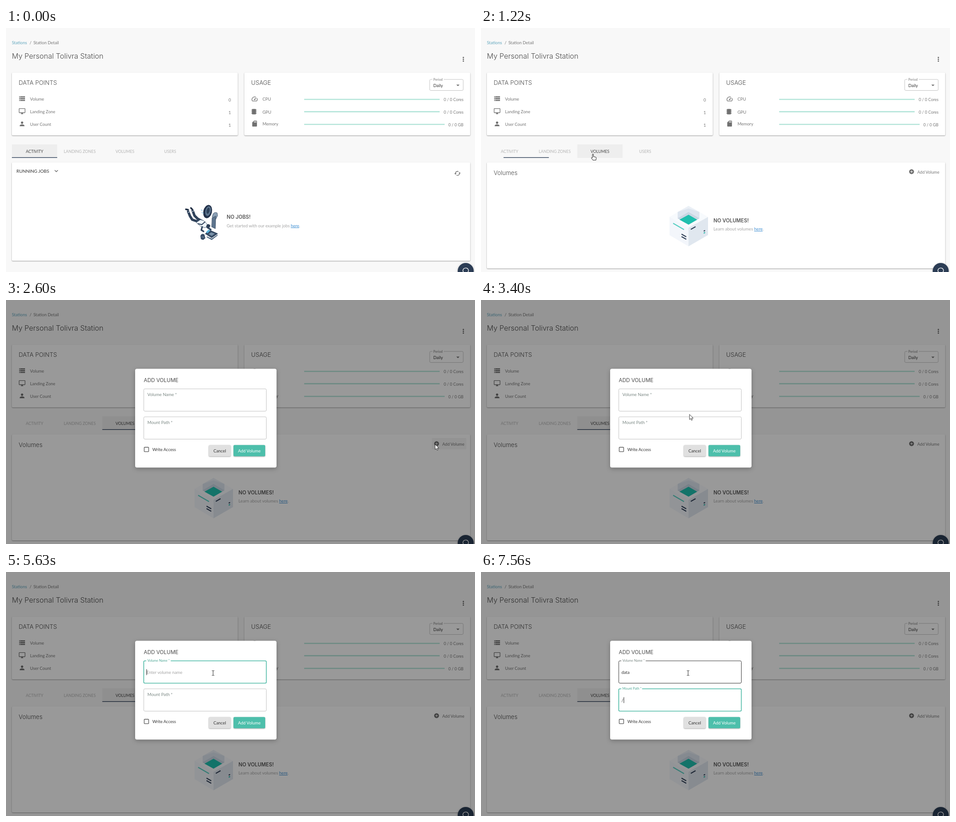
An HTML page for the animation above (8000 ms loop, 1035 by 541 pixels).

```html
<!DOCTYPE html>
<html lang="en">
<head>
<meta charset="utf-8">
<title>Add a volume</title>
<style>
  html, body { margin: 0; width: 100%; height: 100%; overflow: hidden; background: #f8f8f8; }
  svg { display: block; width: 100%; height: 100%; }
  text { font: 9.4px Lato, "Open Sans", sans-serif; fill: #777; white-space: pre; }
  .head { font: 300 13.1px Inter, sans-serif; fill: #4a4a4a; }
  .bold { font: 600 11.1px Inter, sans-serif; fill: #555; }
  .end { text-anchor: end; }
  .mid { text-anchor: middle; }
  .tab { font-size: 8.8px; text-anchor: middle; fill: #b4b4b4; }
  .tab.on { fill: #444; }
  .load { font-size: 8.9px; text-anchor: end; }
  .pale { fill: #a5a5a5; }
  .link { fill: #3f8fd2; text-decoration: underline; }
  .dark { fill: #333; }
  .card { fill: #fff; filter: drop-shadow(0 1px 1px rgba(0,0,0,.38)); }
  .icon { fill: #707070; }
  .bar { stroke: #b5e5da; stroke-width: 2.6; }
  .line { fill: none; stroke: #c2c2c2; }
  .btn { filter: drop-shadow(0 1px 1px rgba(0,0,0,.35)); }
</style>
</head>
<body>
<svg viewBox="0 0 1035 541" preserveAspectRatio="none">
  <rect width="1035" height="541" fill="#f8f8f8"/>

  <!-- heading -->
  <text x="13" y="35.5" style="fill:#5fa5bd">Stations</text>
  <text x="52" y="35.5">/</text>
  <text x="60.5" y="35.5">Station Detail</text>
  <text class="head" x="13" y="68" style="font-size:16px">My Personal Tolivra Station</text>
  <g fill="#555"><circle cx="1009.3" cy="65.3" r="1.4"/><circle cx="1009.3" cy="69.3" r="1.4"/><circle cx="1009.3" cy="73.3" r="1.4"/></g>

  <!-- data points -->
  <rect class="card" x="13" y="99" width="498.5" height="139" rx="2"/>
  <text class="head" x="28" y="126">DATA POINTS</text>
  <g class="icon">
    <path transform="translate(27.7 148.8) scale(.65)" d="M2 20h20v-4H2v4zm2-3h2v2H4v-2zM2 4v4h20V4H2zm4 3H4V5h2v2zm-4 7h20v-4H2v4zm2-3h2v2H4v-2z"/>
    <path transform="translate(27.7 176.7) scale(.65)" d="M21 2H3c-1.1 0-2 .9-2 2v12c0 1.1.9 2 2 2h7v2H8v2h8v-2h-2v-2h7c1.1 0 2-.9 2-2V4c0-1.1-.9-2-2-2zm0 14H3V4h18v12z"/>
    <path transform="translate(27.7 204.7) scale(.65)" d="M12 12c2.2 0 4-1.8 4-4s-1.8-4-4-4-4 1.8-4 4 1.8 4 4 4zm0 2c-2.7 0-8 1.3-8 4v2h16v-2c0-2.7-5.3-4-8-4z"/>
  </g>
  <text x="53" y="160.5">Volume</text><text class="end" x="496.5" y="162.5">0</text>
  <text x="53" y="188.5">Landing Zone</text><text class="end" x="496.5" y="190.5">1</text>
  <text x="53" y="216.5">User Count</text><text class="end" x="496.5" y="218.5">1</text>

  <!-- usage -->
  <rect class="card" x="526" y="99" width="498.5" height="139" rx="2"/>
  <text class="head" x="541" y="126">USAGE</text>
  <rect class="line" x="935" y="114" width="74" height="24.5" rx="2.5"/>
  <path d="M941 114h25" stroke="#fff" stroke-width="2"/>
  <text x="943" y="117" style="font-size:7.3px">Period</text>
  <text class="dark" x="943" y="130.5">Daily</text>
  <path class="icon" d="M993.8 125.5h7l-3.5 3.6z"/>
  <g class="icon">
    <path transform="translate(540.8 149.5) scale(.65)" d="M20.4 8.6l-1.2 1.8a8 8 0 0 1-.3 7.6H5.1A8 8 0 0 1 15.6 6.9l1.8-1.3A10 10 0 0 0 3.4 19a2 2 0 0 0 1.7 1h13.8a2 2 0 0 0 1.8-1 10 10 0 0 0-.3-10.4zm-9.8 6.8a2 2 0 0 0 2.8 0l5.7-8.5-8.5 5.7a2 2 0 0 0 0 2.8z"/>
    <rect x="543" y="179.5" width="8.5" height="12" rx="1"/>
    <path d="M541.5 182h11.5M541.5 185.5h11.5M541.5 189h11.5" stroke="#707070" stroke-width="1.4"/>
    <path transform="translate(540.8 204.3) scale(.65)" d="M18 2h-8L4 8v12c0 1.1.9 2 2 2h12c1.1 0 2-.9 2-2V4c0-1.1-.9-2-2-2zm-6 6h-2V4h2v4zm3 0h-2V4h2v4zm3 0h-2V4h2v4z"/>
  </g>
  <text x="566" y="161">CPU</text><text class="load" x="1009.5" y="162">0 / 0 Cores</text>
  <text x="566" y="189.5">GPU</text><text class="load" x="1009.5" y="190">0 / 0 Cores</text>
  <text x="566" y="216">Memory</text><text class="load" x="1009.5" y="217.5">0 / 0 GB</text>
  <path class="bar" d="M658 158.300H957M658 185.600H957M658 213.700H968"/>

  <!-- tabs -->
  <rect id="tabBg" y="258" width="100" height="30" fill="#eee"/>
  <text class="tab" id="activityTab" x="63" y="276.5">ACTIVITY</text>
  <text class="tab" x="162.7" y="276.5">LANDING ZONES</text>
  <text class="tab" id="volumesTab" x="262.5" y="276.5">VOLUMES</text>
  <text class="tab" x="362.3" y="276.5">USERS</text>
  <rect id="ink" y="286.6" width="100" height="1.4" fill="#2e3f58"/>

  <rect class="card" id="panel" x="13" y="298" width="1011.5" height="218" rx="2"/>

  <g id="jobs">
    <text class="dark" x="23" y="321" style="font-size:9.9px">RUNNING JOBS</text>
    <path d="M107.5 315.3l3.5 3.5 3.5-3.5" fill="none" stroke="#666" stroke-width="1.3"/>
    <path class="icon" transform="translate(988.6 314.5) scale(.65)" d="M19 8l-4 4h3c0 3.3-2.7 6-6 6-1 0-2-.3-2.8-.7l-1.5 1.5C9 19.5 10.4 20 12 20c4.4 0 8-3.6 8-8h3l-4-4zM6 12c0-3.3 2.7-6 6-6 1 0 2 .3 2.8.7l1.5-1.5C15 4.5 13.6 4 12 4c-4.4 0-8 3.6-8 8H1l4 4 4-4H6z"/>
    <!-- floating astronaut -->
    <g stroke-linecap="round" stroke-linejoin="round">
      <path d="M455 419l2-7q4-5 9-2l1 6-4 8z" fill="#8ba0b5" stroke="#34475e" stroke-width=".8"/>
      <path d="M455 421l8-4 -1 28-8-4z" fill="#5d748d" stroke="#34475e" stroke-width=".8"/>
      <path d="M402 407l4 10 5 8 15 5M412 405l4 11 7 7 9 5" fill="none" stroke="#2f425b" stroke-width="5.5"/>
      <path d="M397 402l5 1M408 399l3 3" stroke="#1f2d42" stroke-width="3.5"/>
      <path d="M402 409l4-2M411 407l4-2" stroke="#dfe8f0" stroke-width="1.3"/>
      <path d="M420 431l9-6 7 2 9 9-5 7-10-3z" fill="#edf3f8" stroke="#435970" stroke-width=".9"/>
      <path d="M424 434l8 2 7-6" fill="none" stroke="#2f425b" stroke-width="2.2"/>
      <path d="M443 436q6-3 8 3l-3 5-6-2z" fill="#2b3d55"/>
      <path d="M433 441l-2 7 5 3M444 442l8 5" fill="none" stroke="#30445d" stroke-width="3.3"/>
      <ellipse cx="445" cy="407" rx="9.5" ry="15" transform="rotate(13 445 407)" fill="#22314a"/>
      <ellipse cx="446" cy="406" rx="6" ry="11" transform="rotate(13 446 406)" fill="#5b748d"/>
      <ellipse cx="446" cy="405" rx="3.3" ry="7" transform="rotate(13 446 405)" fill="#2d415a"/>
      <path d="M431 403l2 2M432 409l4 2" stroke="#7fc3e6" stroke-width="1.3"/>
      <path d="M440 456l9-8 18 8-13 9z" fill="#334963" stroke="#2a3c54"/>
      <path d="M441 453l6-6 4 2-6 6z" fill="#58b4dd"/>
      <path d="M447 457l6-4 8 3-7 5z" fill="#7890a6"/>
      <path d="M443 462l11 5 13-9v2l-13 10-11-6z" fill="#48617b"/>
      <path d="M429 461q3-7 9-3l2 8-5 4-5-2z" fill="#3a5069"/>
      <path d="M432 463l5 1" stroke="#8ba0b5"/>
    </g>
    <text class="bold" x="487" y="423">NO JOBS!</text>
    <text class="pale" x="487" y="441.5">Get started with our example jobs <tspan class="link">here</tspan>.</text>
  </g>

  <g id="volumes">
    <text class="head" x="28" y="325.5">Volumes</text>
    <rect id="addHover" x="940" y="306" width="76" height="25" rx="2" fill="#f4f4f4"/>
    <path class="icon" transform="translate(943.7 312.1) scale(.54)" d="M12 2C6.5 2 2 6.5 2 12s4.5 10 10 10 10-4.5 10-10S17.5 2 12 2zm5 11h-4v4h-2v-4H7v-2h4V7h2v4h4v2z"/>
    <text class="end" x="1011.5" y="322.5" style="font-size:9.2px">Add Volume</text>
    <!-- storage box -->
    <path d="M458 394l43 25v40l-43 25-42-25v-40z" fill="#f7fafd"/>
    <path d="M416 419l42 24v41l-42-25z" fill="#f3f6fb"/>
    <path d="M501 419l-43 24v41l43-25z" fill="#e0e7ef"/>
    <path d="M434 408l24-13 24 13v14l-24 14-24-14z" fill="#dde5ef"/>
    <path d="M434 408l24-13 24 13-24-8z" fill="#ebf0f6"/>
    <path d="M434 422l24-14 24 14-24 14z" fill="#c9d6e3"/>
    <path d="M438 425l20-11 19 11-19 11z" fill="#1fbfae"/>
    <g fill="none" stroke="#33435a" stroke-width="2.2">
      <path d="M424 433l24 14" stroke="#58cfc2"/>
      <path d="M442.5 457l10.5 6M442.5 462.5l10.5 6M463 446.5l10.5-6M491.5 450.5l3-1.7"/>
      <path d="M491.5 455l3-1.7" stroke="#2eb8a9"/>
    </g>
    <text class="bold" x="513" y="430.5">NO VOLUMES!</text>
    <text class="pale" x="513" y="449" style="font-size:9.6px">Learn about volumes <tspan class="link">here</tspan>.</text>
  </g>

  <!-- help button -->
  <g style="filter:drop-shadow(0 1px 2px rgba(0,0,0,.3))"><circle cx="1014.5" cy="538.7" r="17.7" fill="#2c3d55"/></g>
  <ellipse cx="1014.5" cy="537.7" rx="6.2" ry="5.6" fill="none" stroke="#fff" stroke-width="1.4"/>

  <g id="dialog">
    <rect width="1035" height="541" opacity=".4"/>
    <rect x="285" y="152.5" width="312" height="219" rx="4" fill="#fff" style="filter:drop-shadow(0 3px 5px rgba(0,0,0,.25))"/>
    <text class="head" x="304" y="181.5" style="font-size:11.5px;font-weight:400">ADD VOLUME</text>
    <g id="fields"></g>
    <rect x="305" y="326.5" width="9.8" height="9.8" rx="1" fill="none" stroke="#555" stroke-width="1.3"/>
    <text class="dark" x="323" y="335.3" style="font-size:9.1px">Write Access</text>
    <rect class="btn" x="447.5" y="321.5" width="48.5" height="25" rx="2.5" fill="#e0e0e0"/>
    <text class="dark mid" x="471.5" y="338">Cancel</text>
    <rect class="btn" x="502" y="321.5" width="70" height="25" rx="2.5" fill="#4dbfab"/>
    <text class="mid" x="537" y="338" style="fill:#fff">Add Volume</text>
  </g>

  <g id="cursor">
    <circle id="click" cx="1.5" cy="0" r="8" fill="#ffec1c" opacity=".75"/>
    <path id="arrow" d="M0 0v11.5l2.7-2.4 1.7 4 2-.9-1.7-3.9h3.6z" fill="#fff" stroke="#222" stroke-width=".9"/>
    <path id="hand" d="M-1 1q1-2 2.2 0v5.2l4.6 1q1.7.4 1.5 2l-.7 4.8H0l-3.7-5q.8-1.8 2.7 0z" fill="#fff" stroke="#222"/>
    <path id="beam" d="M-2.5-5.5q2 0 2.5 1 .5-1 2.5-1M0-4.500v9M-2.500 5.500q2 0 2.500-1 .5 1 2.500 1" fill="none" stroke="#222"/>
  </g>
</svg>
<script>
const LOOP = 8000;
const $ = id => document.getElementById(id);
const show = (el, on) => el.style.display = on ? "" : "none";
const clamp = v => Math.min(1, Math.max(0, v));
const between = (t, a, b) => t >= a && t < b;
const mix = (a, b, p) => a + (b - a) * p;
const easeIn = p => p * p;
const easeOut = p => 1 - (1 - p) ** 2;
const easeInOut = p => p * p * (3 - 2 * p);

function bezier(x1, y1, x2, y2) {
  const at = (a, b, s) => 3 * a * s * (1 - s) ** 2 + 3 * b * s * s * (1 - s) + s ** 3;
  return x => {
    let lo = 0, hi = 1;
    for (let i = 0; i < 20; i++) {
      const m = (lo + hi) / 2;
      if (at(x1, x2, m) < x) lo = m; else hi = m;
    }
    return at(y1, y2, hi);
  };
}
const slide = bezier(.4, 0, .2, 1);
const settle = bezier(0, 0, .2, 1);

// time, x, y, easing towards this point
const path = [
  [140, 890, 488],
  [920, 247, 279, easeInOut],
  [1380, 247, 279, easeIn],
  [1800, 866, 364, easeIn],
  [2300, 947, 320, easeOut],
  [2660, 947, 320, easeOut],
  [3380, 461, 262, easeInOut],
  [3560, 457, 224, easeOut]
];
function pointer(t) {
  const i = path.findIndex(k => k[0] > t);
  if (i < 1) return path[i < 0 ? path.length - 1 : 0].slice(1, 3);
  const [t0, x0, y0] = path[i - 1], [t1, x1, y1, ease] = path[i];
  const p = ease((t - t0) / (t1 - t0));
  return [mix(x0, x1, p), mix(y0, y1, p)];
}

function makeField(y, label, hint, notch) {
  const g = document.createElementNS("http://www.w3.org/2000/svg", "g");
  g.innerHTML = `<rect class="line" x="304" y="${y}" width="270.5" height="49.5" rx="2.5"/>
    <path d="M309.5 ${y}h${notch}" stroke="#fff" stroke-width="3"/>
    <text x="312">${label} *</text>
    <text class="pale" x="310" y="${y + 29}">${hint}</text>
    <text class="dark" x="310" y="${y + 29}"></text>
    <path stroke="#222"/>`;
  $("fields").append(g);
  const [box, gap, name, tip, value, caret] = g.children;
  return (t, start, focused, hovered, typed, blink) => {
    const p = settle(clamp((t - start) / 200));
    box.style.stroke = focused ? "#4bb9a5" : hovered ? "#333" : "#c2c2c2";
    box.style.strokeWidth = focused ? 1.6 : 1;
    gap.style.opacity = p;
    name.setAttribute("y", mix(y + 16.3, y + 2.4, p));
    name.style.fontSize = mix(9.5, 7.2, p) + "px";
    name.style.fill = focused ? "#4fa796" : "#7c8985";
    tip.style.opacity = typed ? 0 : p;
    value.textContent = typed;
    const x = 310.5 + (typed ? value.getComputedTextLength() + .5 : 0);
    caret.setAttribute("d", `M${x} ${y + 18.5}v13`);
    show(caret, focused && blink);
  };
}
const nameField = makeField(197, "Volume Name", "Enter volume name", 54);
const pathField = makeField(259, "Mount Path", "Enter mount path", 46);

function draw(t) {
  const onVolumes = t >= 1150;
  show($("jobs"), !onVolumes);
  show($("volumes"), onVolumes);
  $("panel").setAttribute("height", onVolumes ? 235 : 218);
  $("tabBg").setAttribute("x", onVolumes ? 212.5 : 13);
  $("activityTab").classList.toggle("on", !onVolumes);
  $("volumesTab").classList.toggle("on", onVolumes);
  $("ink").setAttribute("x", mix(13, 212.5, slide(clamp((t - 1153) / 300))));

  const [x, y] = pointer(t);
  const open = t >= 2600;
  const overAdd = x > 940 && y < 331;
  const overName = open && x < 574 && x > 304 && y < 246;
  const overTab = y < 288 && x < 412;
  show($("addHover"), overAdd);
  show($("dialog"), open);

  const inName = between(t, 3600, 7030), inPath = t >= 7030;
  const typed = "data".slice(0, t < 6170 ? 0 : 1 + Math.floor((t - 6170) / 76.6));
  const blink = !between(t, 4090, 4620) && !between(t, 5080, 5630) && !between(t, 6950, 7030);
  nameField(t, 3600, inName, overName, typed, blink);
  pathField(t, 7030, inPath, false, t >= 7560 ? "/" : "", blink);

  const hand = !open && (overAdd || overTab);
  show($("cursor"), t >= 140);
  $("cursor").setAttribute("transform", `translate(${x} ${y})`);
  show($("hand"), hand);
  show($("beam"), overName);
  show($("arrow"), !hand && !overName);
  show($("click"), between(t, 1000, 1140) || between(t, 2380, 2600) || between(t, 3560, 3700));
}

function frame() {
  draw(performance.now() % LOOP);
  requestAnimationFrame(frame);
}
frame();
</script>
</body>
</html>
```
